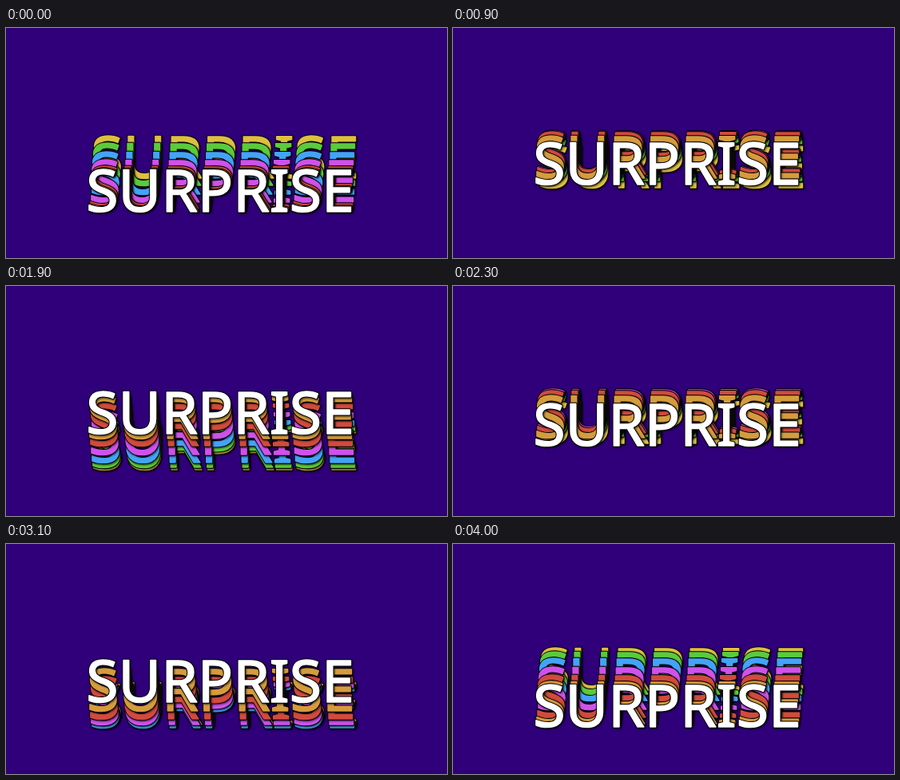
An HTML page that plays this animation: 552x288 px, repeating every 4.1 s.

```html
<!DOCTYPE html>
<html lang="en">
<head>
<meta charset="utf-8">
<title>Surprise</title>
<style>
  html, body { margin: 0; width: 100%; height: 100%; overflow: hidden; background: #2f007a; }
  svg { display: block; width: 552px; height: 288px; }
  text {
    font: 400 73.4px "Noto Sans", "Open Sans", sans-serif;
    stroke-linejoin: round;
  }
  g { filter: drop-shadow(1px 1px 1px rgba(0, 0, 0, .75)); }
</style>
</head>
<body>
<svg viewBox="0 0 552 288"></svg>
<script>
  const LOOP = 4100, STEP = 100;   // the picture advances in 100 ms steps
  const HALF = LOOP / 6;           // one sweep up or down
  const LEAD = 40, LAG = 92;       // phase at the start, delay per layer
  const LEFT = 100.2, LOW = 230, RISE = 48;
  const COLORS = ['#fff', '#d49c3d', '#d14b3d', '#cf52eb', '#44a3f7', '#5acb3c', '#debf40'];

  const svg = document.querySelector('svg');

  function add(parent, tag, attrs = {}) {
    const el = document.createElementNS('http://www.w3.org/2000/svg', tag);
    for (const name in attrs) el.setAttribute(name, attrs[name]);
    return parent.appendChild(el);
  }

  function addWord(parent, x, color, weight) {
    const attrs = { x, y: LOW, fill: color, stroke: color, 'stroke-width': weight };
    add(parent, 'text', attrs).textContent = 'SURPRISE';
  }

  // Back layers come first; each trails the one in front of it.
  const layers = COLORS.map((color, i) => ({ color, i })).reverse().map(({ color, i }) => {
    const group = add(svg, 'g');
    addWord(group, LEFT + i, '#000', 3.4);
    addWord(group, LEFT + i, color, 1.6);
    const anim = group.animate(
      [{ transform: 'translateY(0px)' }, { transform: `translateY(${-RISE}px)` }],
      { duration: HALF, easing: 'ease-in-out', direction: 'alternate', iterations: Infinity }
    );
    anim.pause();
    return { anim, offset: LOOP + LEAD - i * LAG };
  });

  function draw() {
    const t = Math.floor(performance.now() % LOOP / STEP) * STEP;
    for (const { anim, offset } of layers) anim.currentTime = t + offset;
    requestAnimationFrame(draw);
  }
  draw();
</script>
</body>
</html>
```
